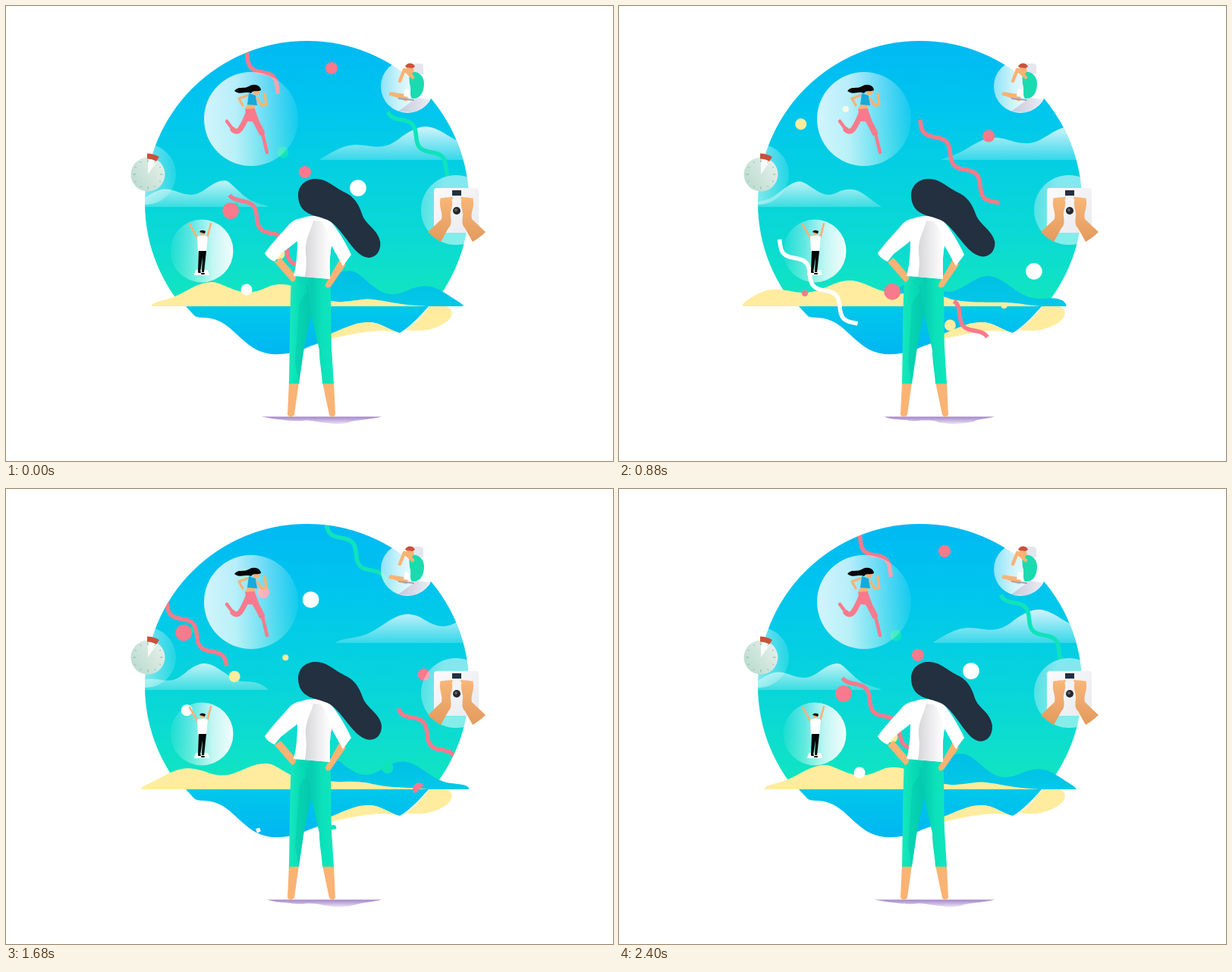
Animation of 800 by 600 pixels, one loop 2440 ms. Source, as an HTML page with a canvas:

```html
<!DOCTYPE html>
<html lang="en">
<head>
<meta charset="utf-8">
<title>Healthy day</title>
<style>
html, body { margin: 0; width: 100%; height: 100%; overflow: hidden; background: #fff; }
canvas { display: block; width: 800px; height: 600px; }
</style>
</head>
<body>
<canvas id="stage" width="800" height="600"></canvas>
<script>
const g = document.getElementById('stage').getContext('2d');
const LOOP = 2440, CYCLE = 2400, STEP = 40, TAU = Math.PI * 2;
const PINK = '#f87a8c', WHITE = '#fff', YELLOW = '#ffec9e', GREEN = '#10e3ba';
const SKIN = '#f9b374', DARK = '#223040', INK = '#050608';
const CX = 396.7, CY = 259.7, R = 213.7;

function ramp(x0, y0, x1, y1, ...stops) {
  const r = g.createLinearGradient(x0, y0, x1, y1);
  stops.forEach((c, i) => r.addColorStop(i / (stops.length - 1), c));
  return r;
}
const white = a => `rgba(255,255,255,${a})`;
const fill = (color, d) => { g.fillStyle = color; g.fill(new Path2D(d)); };
function line(color, width, d, cap = 'round') {
  g.strokeStyle = color; g.lineWidth = width; g.lineCap = cap; g.lineJoin = 'round';
  g.stroke(new Path2D(d));
}
function disc(color, x, y, r) {
  g.fillStyle = color;
  g.beginPath(); g.arc(x, y, r, 0, TAU); g.fill();
}

// Motion rules: t in ms, everything repeats once per CYCLE
const frac = v => v - Math.floor(v);
const edge = (u, power) => Math.min(1, Math.max(0, u)) ** power;
const crest = (x, t, x0, length, depth) =>
  1 - depth + depth * Math.cos(TAU * ((x - x0) / length - t / CYCLE));

function hills(color, from, to, base, height) {
  g.beginPath();
  g.moveTo(from, base);
  for (let x = from; x < to; x += x - from < 8 || to - x < 8 ? 1 : 4) g.lineTo(x, base - height(x));
  g.lineTo(to, base);
  g.fillStyle = color; g.fill();
}

// Slightly bent flight through (x, y) at the loop start; speeds in px per second
function dot(t, color, r, x, y, vx, vy, bend = 0) {
  for (let n = -1; n < 2; n++) {
    const s = (t + n * CYCLE) / 1000, b = bend * s * s;
    if (Math.abs(s) < 2) disc(color, x + vx * s + .8 * b, y + vy * s - .6 * b, r);
  }
}

// A stretch of staircase ripple running down a diagonal; its head is at ripple `head` at time `when`
function worm(t, color, x, y, when, head, end = 99) {
  const dx = 39.5, dy = 42.8, n = Math.hypot(dx, dy), amp = 6.8;
  for (let s = t - CYCLE; s < t + 2 * CYCLE; s += CYCLE) {
    const h = head + (s - when) / 1000 * 3.95, a = Math.max(-1, h - 2.6), b = Math.min(h, end);
    if (a >= b || a > 10) continue;
    g.beginPath();
    for (let i = 0; i <= 60; i++) {
      const u = a + (b - a) * i / 60, w = -amp * Math.sin(u * TAU) / n;
      g.lineTo(x + u * dx + w * dy, y + u * dy - w * dx);
    }
    g.strokeStyle = color; g.lineWidth = 5.5; g.lineCap = 'butt'; g.lineJoin = 'round';
    g.stroke();
  }
}

function bubble(x, y, r, ...alphas) {
  disc(ramp(x - r, 0, x + r, 0, ...alphas.map(white)), x, y, r);
}

function sky(t) {
  g.save();
  g.beginPath(); g.rect(0, 0, 800, 396); g.clip();
  g.beginPath(); g.arc(CX, CY, R, 0, TAU); g.clip();
  g.fillStyle = ramp(0, 46, 0, 396, '#00b9f3', '#00c5ee', '#05d0e1', '#0bdad3', '#12e6be');
  g.fillRect(0, 0, 800, 600);
  const far = 407 + 30 * frac((t - 1900) / CYCLE);
  hills(ramp(0, 160, 0, 203, white(.8), white(.2)), far, 620, 203,
    x => 44 * edge((x - far) / 110, .75) * crest(x, t, 440, 113, .25));
  hills(ramp(0, 230, 0, 265, white(.75), white(.2)), 160, 346, 265,
    x => 35 * edge((x - 160) / 80, .7) * edge((346 - x) / 55, .85) * crest(x, t, 200, 88, .27));
  g.restore();
}

function sea() {
  fill(YELLOW, 'M527 427C538 420 548 410 558 396H580C592 400 590 412 575 420C560 428 545 430 527 427Z');
  fill(ramp(0, 396, 0, 459, '#00c8ea', '#00b6f2'),
    'M237 396H557C545 410 530 425 519 431C505 428 495 417 478 417C455 418 440 436 400 449C380 458 365 460 350 459C310 455 300 412 262 411Q250 411 248 408Z');
  fill(YELLOW, 'M422 434C445 426 460 416 478 417C495 417 505 428 519 431C490 424 460 432 422 440Z');
}

function shore(t) {
  const tip = 600 - 12 * Math.cos(TAU * (t - 680) / CYCLE);
  hills(ramp(0, 350, 0, 396, '#00bfe6', '#04c8e6'), 315, tip, 396,
    x => 47 * edge((x - 315) / 100, 1) * edge((tip - x) / 140, .5) * crest(x, t, 450, 113, .295));
  const toe = 154 + 46 * frac((t - 440) / CYCLE);
  hills(YELLOW, toe, 555, 396,
    x => 34 * edge((x - toe) / 85, .5) * (1 - .7 * edge((x - 350) / 90, 1)) *
      edge((555 - x) / 80, 1) * crest(x, t, 262, 113, .23));
}

const air = new Path2D('M232 396A213.7 213.7 0 1 1 588 355L545 396C530 412 515 425 487 441C455 446 430 449 400 453C370 462 330 460 310 445C290 425 275 411 248 408Z');

function drift(t) {
  g.save();
  g.clip(air);
  dot(t, PINK, 8, 429, 82, 59, 107, 10);
  dot(t, WHITE, 10.8, 464, 240, 90, 128, 6);
  dot(t, PINK, 8, 394, 219, 80, 112, 7);
  dot(t, GREEN, 4, 302, 264, 77, 109);
  dot(t, YELLOW, 7.5, 360, 327, 84, 109, 4);
  dot(t, PINK, 10.8, 296, 270, 80, 116, -10);
  dot(t, WHITE, 7.5, 317, 374, 103, 119, -11);
  dot(t, PINK, 4.2, 178, 297, 76, 93);
  dot(t, YELLOW, 4, 431, 300, 87, 108);
  dot(t, GREEN, 7.5, 365, 193, 74, 110, 6);
  worm(t, PINK, 318, 66, 0, 1.1);
  worm(t, PINK, 212, 150, 2080, 3.55, 6.8);
  worm(t, WHITE, 212, 311, 360, .5, 3.2);
  worm(t, GREEN, 422, 43, 2080, 3.5, 4.15);
  g.restore();
}

function runner() {
  bubble(323, 149, 62, .82, .72, .4, .08);
  line(SKIN, 3.4, 'M318 118L307 122L312 131');
  line(PINK, 7, 'M320 139Q315 153 309 162Q304 168 299 163');
  line(PINK, 4.5, 'M300 164L291 152');
  line(PINK, 8, 'M322 140Q332 156 337 167');
  line(PINK, 4.5, 'M338 168L344 193');
  fill(PINK, 'M315 135L327 133L334 153L318 152Z');
  fill(SKIN, 'M320 126L330 128L327 135L315 136Z');
  fill('#16a9dc', 'M320 115L329 118L331 131L318 130Z');
  line(SKIN, 3.4, 'M331 122L337 131L343 130L341 116');
  disc(SKIN, 330, 113, 4.5);
  fill(INK, 'M301 112C306 105 313 110 320 106C327 101 336 105 336 111C330 114 326 110 323 115C317 112 308 118 301 112Z');
}

function sitUp() {
  bubble(529, 106, 35, .55, .8, .95, 1);
  g.save();
  g.beginPath(); g.arc(529, 106, 35, 0, TAU); g.clip();
  fill('#e4e5ee', 'M534 76H550V90H534Z');
  fill(ramp(515, 0, 560, 0, '#c3c6d8', '#eceef5'), 'M517 139L541 121L562 124L548 141Z');
  line(SKIN, 5, 'M528 119L507 116');
  line(SKIN, 5, 'M509 116L527 123');
  line('#9fa3b5', 2, 'M518 122L537 124');
  fill(WHITE, 'M526 109L538 112L537 121L524 119Z');
  g.restore();
  fill('#1adbb0', 'M531 88C541 84 551 91 551 102C551 114 546 123 535 122C531 117 535 110 532 103Z');
  disc(SKIN, 532, 85, 5.5);
  line(SKIN, 4.5, 'M536 94L525 84L519 99');
  fill('#cc513c', 'M526 80C528 74 537 74 539 80L536 82L528 81Z');
}

function stopwatch() {
  bubble(184, 222, 40, .8, .6, .35, .12);
  disc(ramp(168, 236, 206, 208, '#bcdccf', '#e4efea'), 187, 222, 22.5);
  fill(white(.8), 'M187 222L187 201L199 205Z');
  line('#c9523c', 7, 'M186 198Q194 198 200 202', 'butt');
  for (let i = 0; i < 12; i++) {
    const a = i * TAU / 12, r = i % 3 ? 17.5 : 16;
    const p = q => `${187 + q * Math.sin(a)} ${222 - q * Math.cos(a)}`;
    line('#82b8a5', 1, `M${p(r)}L${p(19.5)}`, 'butt');
  }
}

function cheering() {
  bubble(258, 323, 41.5, .06, .35, .75, .95);
  fill(WHITE, 'M250 348H266L268 355H248Z');
  line(SKIN, 2.6, 'M253 307L242 288M265 306L270 287');
  fill(WHITE, 'M252 304Q259 301 266 304L264 324H253Z');
  fill(INK, 'M254 323H264L261 351H258L259 331L256 351H253Z');
  line(INK, 2, 'M254 351H256M258 353H261');
  disc(SKIN, 259, 299, 3.2);
  fill(INK, 'M255 298Q257 294 263 297L262 300Z');
}

function scale() {
  bubble(593, 269, 46, .3, .5, .5, .4);
  g.fillStyle = ramp(564, 240, 622, 299, '#fafafc', '#e9eaee');
  g.beginPath(); g.roundRect(564, 240, 59, 59, 4); g.fill();
  g.fillStyle = DARK; g.fillRect(588, 243, 12, 7);
  const skin = ramp(0, 252, 0, 311, '#f8b679', '#e39a5d');
  for (const flip of [1, -1]) {
    g.save();
    g.translate(594, 0); g.scale(flip, 1);
    fill(skin, 'M-22 257C-21 252 -8 251 -6 257C-5 266 -9 270 -8 277C-7 285 -7 289 -11 293L-21 311C-28 307 -34 302 -38 298L-20 281C-18 273 -23 266 -22 257Z');
    for (let i = 0; i < 5; i++) disc('#f8b679', -20 + i * 3.2, 255 - i * .4, 1.9);
    g.restore();
  }
  disc('#24282e', 594, 270, 5);
  disc('#5c636b', 593, 269, 2);
}

function shadow(t) {
  const x = 335 + 18 * frac((t - 1100) / 1200), w = x - 344;
  fill(ramp(0, 542, 0, 552, '#a78acb', '#f1ebf8'),
    `M${x} 541.5H495C482 545 470 545 ${462 + w} 548C445 553 425 551 ${410 + w} 547C395 545 386 549 ${374 + w} 546Q355 545 ${x} 541.5Z`);
}

function woman(t) {
  fill(SKIN, 'M373 496H386L380 539Q375 545 371 539Z');
  fill(SKIN, 'M417 496H432L434 539Q430 545 426 539Z');
  fill(ramp(374, 0, 432, 0, '#16e8bb', '#08dcb6', '#06cdb2', '#0ce2ba', '#10e6bc'),
    'M376 357H427C429 385 428 420 429 450L432 498H417C416 480 413 470 413 454L402 405L393 450L386 498H373C374 450 374 400 376 357Z');
  fill('rgba(0,190,165,.35)', 'M384 361Q396 364 397 376C393 383 386 386 386 400L381 470L386 497L393 450L402 405L398 370Z');
  fill(SKIN, 'M354 338L362 332L381 354Q384 362 377 364Z');
  fill(SKIN, 'M440 334L448 341L428 370Q421 374 421 367L425 360Z');
  fill(WHITE, 'M389 280C399 275 420 276 428 284C435 292 447 310 455 328L444 343L429 316C426 330 427 345 427 360L379 356C383 342 384 325 384 310L362 327L354 337Q344 333 341 326C350 313 362 301 374 287Q380 281 389 280Z');
  fill(ramp(394, 0, 428, 0, '#d6d6d8', '#ececee', '#fff'),
    'M405 283C402 297 394 306 395 325Q397 340 394 357L427 360C427 345 426 330 429 316Q425 295 415 284Z');

  // Hair swings three times per loop, most at the tip
  const s = Math.sin(TAU * (3 * t / LOOP + .03)), x = 4.5 * s, y = -3 * s;
  fill(DARK, `M385 250C385 235 397 227 410 228C424 229 431 238 445 245
    C459 251 ${465 + x * .2} ${262 + y * .3} ${469 + x * .4} ${275 + y * .3}
    C${473 + x * .6} ${289 + y * .4} ${490 + x} ${294 - y} ${492.5 + x} ${312 + y * .2}
    C${493 + x} ${324 + y} ${487 + x} ${332 + y} ${477 + x} ${332.5 + y}
    C${459 + x * .4} ${331 + y} ${449 - x * .2} ${302 + y * .2} 430 286
    C416 274 386 281 385 250Z`);
}

function draw(t) {
  g.fillStyle = WHITE; g.fillRect(0, 0, 800, 600);
  sky(t);
  sea();
  shore(t);
  drift(t);
  runner(); sitUp(); stopwatch(); cheering(); scale();
  shadow(t);
  woman(t);
}

const start = performance.now();
function tick() {
  const t = (performance.now() - start) % LOOP;
  draw(Math.floor(t / STEP) * STEP);
  requestAnimationFrame(tick);
}
tick();
</script>
</body>
</html>
```
